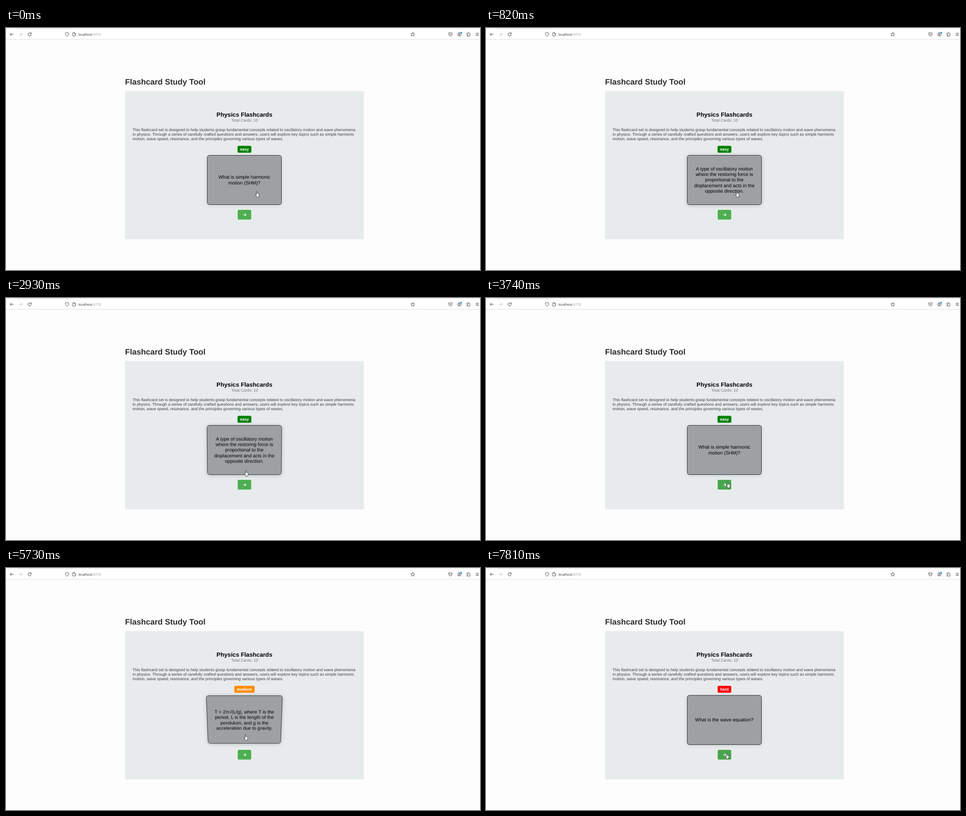
Animation of 1047x535 px, one loop 8 s. Source, as an HTML page:

```html
<!DOCTYPE html>
<html lang="en">
<head>
<meta charset="utf-8">
<title>Flashcard Study Tool</title>
<style>
  html, body { margin: 0; width: 100%; height: 100%; overflow: hidden; background: #fdfdfd; }
  body { position: relative; font-family: "Liberation Sans", Arial, sans-serif; text-rendering: geometricPrecision; }
  svg { position: absolute; left: 0; top: 0; }
  #card {
    position: absolute; box-sizing: border-box; left: 444px; top: 281px; width: 165px; height: 110px;
    padding-top: 1px; border: 1px solid #2b2e30; border-radius: 5.5px; background: #9da1a3; color: #000;
    font-size: 10.54px; line-height: 12.1px; text-align: center; white-space: pre;
    display: flex; align-items: center; justify-content: center;
  }
</style>
</head>
<body>
<svg width="1047" height="535">
  <rect width="1047" height="25" fill="#fff"/>
  <rect width="1047" height="2" fill="#f1f2f3"/>
  <path d="M24 1.5H148" stroke="#dcdddf"/>
  <path d="M0 25H1047" stroke="#dcdcde"/>
  <g fill="none" stroke="#3c3c44" stroke-linecap="round" stroke-linejoin="round">
    <path d="M16.3 14H9M12 11l-3 3 3 3"/>
    <path d="M28.8 14H36M33 11l3 3-3 3" stroke="#bdbdc1"/>
    <path d="M55.3 12.2A3.6 3.6 0 1 0 55.7 14.8M55.8 10.3V12.7H53.3"/>
    <g stroke-width=".9">
      <path d="M135 10L138.5 11.2C138.7 14.6 137.6 17 135 18.2C132.4 17 131.3 14.6 131.5 11.2Z"/>
      <path d="M148 10.3H151.3L153.6 12.6V17.7H148ZM151.2 10.4V12.8H153.5"/>
      <path d="M898.5 9.8l1.3 2.7 3 .4-2.2 2.1.6 3-2.7-1.5-2.7 1.5.6-3-2.2-2.1 3-.4Z"/>
      <path d="M978 10.8H985.2V14A3.6 3.6 0 0 1 978 14ZM979.8 13.2L981.6 15 983.4 13.2"/>
      <circle cx="1001.5" cy="14" r="3.8"/>
      <path d="M1018.2 12H1020.2V11A1.2 1.2 0 0 1 1022.6 11V12H1024.8V17.8H1018.2V16H1019A1.1 1.1 0 0 0 1019 13.8H1018.2Z"/>
      <path d="M1038.2 11.5H1043.8M1038.2 14H1043.8M1038.2 16.5H1043.8"/>
    </g>
  </g>
  <path d="M999.4 16.2a2.2 1.6 0 0 1 4.2 0Z" fill="#3c3c44"/>
  <circle cx="1001.5" cy="12.8" r="1.3" fill="#3c3c44"/>
  <circle cx="1005.5" cy="10.2" r="1.8" fill="#0a9ad8"/>
  <text x="160" y="16.7" font-family="Open Sans, sans-serif" font-size="7.3" fill="#222">localhost<tspan fill="#85858a">:5173</tspan></text>

  <rect x="263" y="139.5" width="527.3" height="327.7" fill="#e7ebec"/>
  <text x="263" y="124.5" font-size="17.6" font-weight="bold" fill="#2d2d2d">Flashcard Study Tool</text>
  <text x="526.7" y="196.2" font-size="13.2" font-weight="bold" text-anchor="middle">Physics Flashcards</text>
  <text x="527" y="207.2" font-size="8.8" fill="#75787a" text-anchor="middle">Total Cards: 10</text>
  <g font-size="8.8" fill="#3d3f40">
    <text x="279.6" y="228.2">This flashcard set is designed to help students grasp fundamental concepts related to oscillatory motion and wave phenomena</text>
    <text x="279.6" y="238.1">in physics. Through a series of carefully crafted questions and answers, users will explore key topics such as simple harmonic</text>
    <text x="279.6" y="248">motion, wave speed, resonance, and the principles governing various types of waves.</text>
  </g>
  <rect id="badge" y="260.4" height="15.4" rx="2.7"/>
  <text id="level" x="526.7" y="271.4" font-size="8.8" font-weight="bold" text-anchor="middle" fill="#fff"></text>
  <rect id="next" x="511.8" y="402" width="29.8" height="21.5" rx="2.5"/>
  <path d="M523.2 413H530.2M527 409.8L530.2 413 527 416.2" fill="none" stroke="#fff" stroke-width="1.2"/>
</svg>
<div id="card"></div>
<svg width="1047" height="535">
  <path id="hand" fill="#fff" stroke="#222" stroke-width=".8" stroke-linejoin="round"
    d="M-1.9-5Q-1.9-6-1-6T-.1-5V-1.3Q.7-1.9 1.3-1Q2.1-1.5 2.7-.6Q4.1-.8 4.1.8V3.1L3.1 5.1V6.9H-1.3V5.5L-3.9 1.9Q-4.2.6-3 .9L-1.9 2.1Z"/>
</svg>
<script>
const LOOP = 8000, FLIP = 600;

// Screen updates come in runs: first time, last time, number of updates
const runs = [[270, 820, 5], [1380, 1830, 4], [2510, 3470, 8], [3590, 3740, 2], [4170, 4170, 1],
  [4750, 4900, 2], [5290, 5880, 5], [6710, 7440, 6], [7810, 7810, 1]];

const cards = [
  { from: 0, level: 'easy', color: '#008000', width: 30.6, front: 'What is simple harmonic\nmotion (SHM)?',
    back: 'A type of oscillatory motion\nwhere the restoring force is\nproportional to the\ndisplacement and acts in the\nopposite direction.' },
  { from: 4170, level: 'medium', color: '#ff8c00', width: 44.8, front: 'What is the formula for the\nperiod of a pendulum?',
    back: 'T = 2π√(L/g), where T is the\nperiod, L is the length of the\npendulum, and g is the\nacceleration due to gravity.' },
  { from: 7810, level: 'hard', color: '#ff0000', width: 30.1, front: 'What is the wave equation?', back: '' }
];

const flips = [190, 2905, 5191, 6580];

// Pointer: time, x, y
const path = [[0, 555, 367], [1230, 555, 367], [1830, 538, 418], [2373, 538, 418], [2921, 530.8, 387],
  [3440, 530.8, 387], [3740, 535, 413], [4600, 535, 413], [4750, 529, 394], [4900, 530, 374],
  [7300, 530, 374], [7440, 532.5, 415.3], [LOOP, 532.5, 415.3]];

const [badge, level, card, next, hand] =
  ['badge', 'level', 'card', 'next', 'hand'].map(id => document.getElementById(id));

function hold(t) {
  let shown = 0;
  for (const [a, b, n] of runs) {
    if (t < a) break;
    const gap = (b - a) / (n - 1 || 1);
    shown = a + gap * Math.min(n - 1, Math.floor((t - a) / (gap || 1) + 1e-6));
  }
  return shown;
}

// cubic-bezier(.25, .1, .25, 1)
function ease(x) {
  if (x <= 0 || x >= 1) return x <= 0 ? 0 : 1;
  let lo = 0, hi = 1, s;
  for (let i = 0; i < 24; i++) {
    s = (lo + hi) / 2;
    if (.75 * s * (1 - s) + s ** 3 < x) lo = s; else hi = s;
  }
  return .3 * s * (1 - s) ** 2 + 3 * s * s * (1 - s) + s ** 3;
}

function pointer(t) {
  const i = path.findIndex(p => p[0] > t);
  const [t0, x0, y0] = path[i - 1], [t1, x1, y1] = path[i];
  const k = (t - t0) / (t1 - t0);
  return [x0 + (x1 - x0) * k, y0 + (y1 - y0) * k];
}

function draw(t) {
  const now = hold(t);
  const data = cards.findLast(c => now >= c.from);
  const angle = flips.reduce((sum, start, i) => sum + (i % 2 ? -180 : 180) * ease((now - start) / FLIP), 0);
  const flipped = angle > 90;
  const tilt = flipped ? angle - 180 : angle;
  const [x, y] = pointer(now);

  level.textContent = data.level;
  badge.setAttribute('x', 526.7 - data.width / 2);
  badge.setAttribute('width', data.width);
  badge.setAttribute('fill', data.color);
  card.textContent = flipped ? data.back : data.front;
  card.style.transform = Math.abs(tilt) < .5 ? 'none' : `perspective(549px) translateY(.3px) rotateX(${tilt}deg)`;
  card.style.boxShadow = flipped ? '0 1px 10px rgba(0,0,0,.2)' : '0 2px 8px rgba(0,0,0,.1)';
  next.setAttribute('fill', y > 404 ? '#48a54c' : '#4caf50');
  hand.setAttribute('transform', `translate(${x} ${y})`);
}

const begin = performance.now();
function tick() {
  draw((performance.now() - begin) % LOOP);
  requestAnimationFrame(tick);
}
tick();
</script>
</body>
</html>
```
